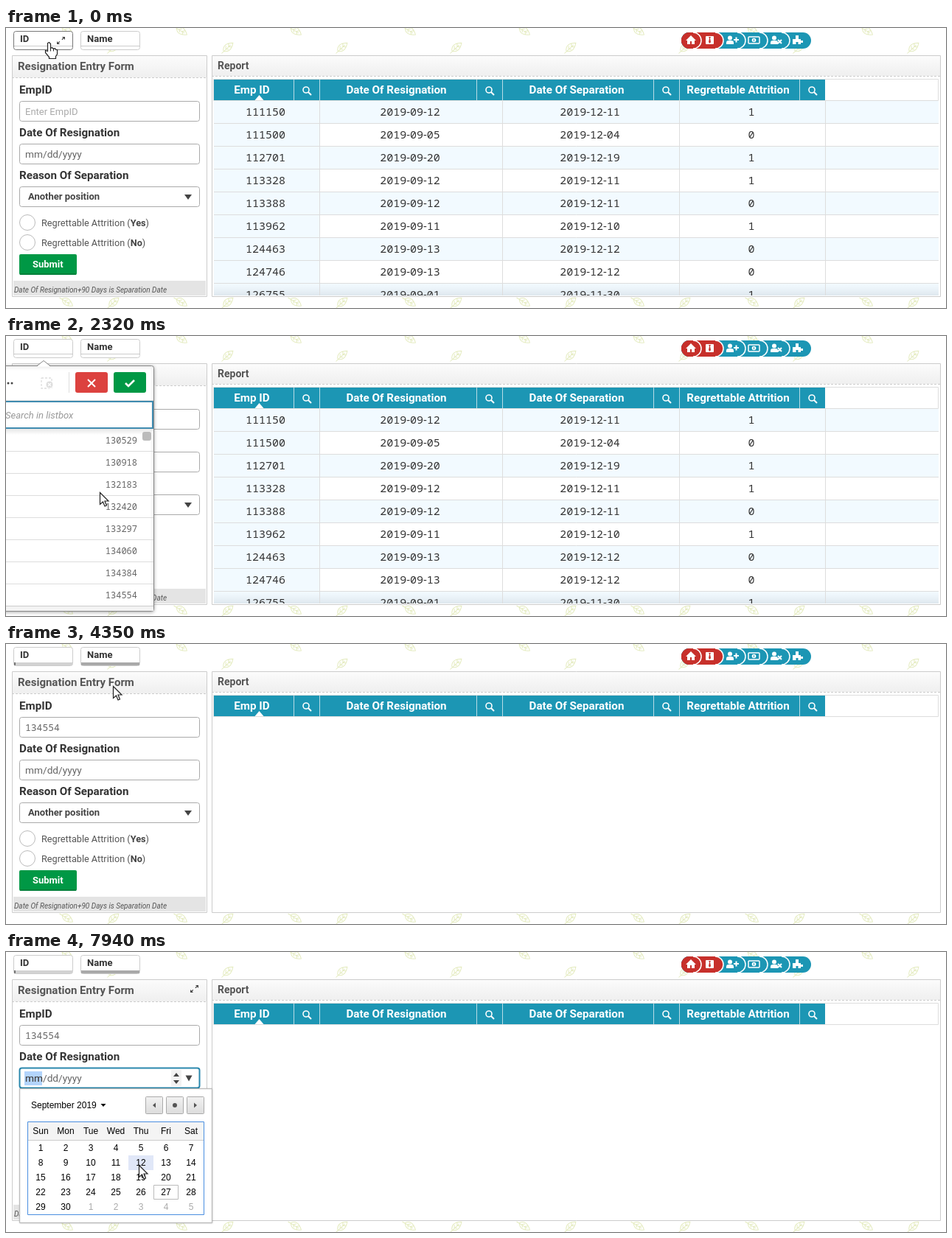
An HTML page with a canvas that plays this animation: 1275x380 px, repeating every 8000 ms.

```html
<!DOCTYPE html>
<html lang="en">
<head>
<meta charset="utf-8">
<title>Resignation Entry Form</title>
<style>
html, body { margin: 0; width: 100%; height: 100%; overflow: hidden; background: #fff; }
canvas { display: block; }
</style>
</head>
<body>
<canvas id="stage" width="1275" height="380"></canvas>
<script>
const c = document.getElementById('stage').getContext('2d');
const LOOP = 8000;
const TEAL = '#1c96b4', RED = '#c7302b', GREEN = '#009845', INK = '#333';
const UI = 'Roboto, sans-serif', MONO = '"Noto Sans Mono", monospace', CAL = '"Liberation Sans", Arial, sans-serif';

// ---- helpers
function fill(x, y, w, h, color) { c.fillStyle = color; c.fillRect(x, y, w, h); }

function box(x, y, w, h, r, color, edge, width = 1) {
  c.beginPath();
  c.roundRect(x, y, w, h, r);
  if (color) { c.fillStyle = color; c.fill(); }
  if (edge) { c.strokeStyle = edge; c.lineWidth = width; c.stroke(); }
}

function poly(points, color, edge, width = 1) {
  c.beginPath();
  points.forEach(([x, y]) => c.lineTo(x, y));
  c.closePath();
  if (color) { c.fillStyle = color; c.fill(); }
  if (edge) { c.strokeStyle = edge; c.lineWidth = width; c.stroke(); }
}

function line(points, color, width = 1, dash = []) {
  c.beginPath();
  points.forEach(([x, y]) => c.lineTo(x, y));
  c.strokeStyle = color;
  c.lineWidth = width;
  c.setLineDash(dash);
  c.stroke();
  c.setLineDash([]);
}

function disc(x, y, r, color, edge, width = 1) {
  c.beginPath();
  c.arc(x, y, r, 0, 7);
  if (color) { c.fillStyle = color; c.fill(); }
  if (edge) { c.strokeStyle = edge; c.lineWidth = width; c.stroke(); }
}

function text(s, x, y, font, color = INK, align = 'left') {
  c.font = font;
  c.fillStyle = color;
  c.textAlign = align;
  c.fillText(s, x, y);
  return c.measureText(s).width;
}

function shade(y0, y1, from, to) {
  const g = c.createLinearGradient(0, y0, 0, y1);
  g.addColorStop(0, from);
  g.addColorStop(1, to);
  return g;
}

function clip(x, y, w, h, draw) {
  c.save();
  c.beginPath();
  c.rect(x, y, w, h);
  c.clip();
  draw();
  c.restore();
}

const down = (x, y, w, h, color) => poly([[x - w / 2, y], [x + w / 2, y], [x, y + h]], color);
const bold = size => `bold ${size}px ${UI}`;
const plain = size => `${size}px ${UI}`;

// ---- background
function leaf(x, y, angle) {
  c.save();
  c.translate(x, y);
  c.rotate(angle);
  c.beginPath();
  c.moveTo(-8, 0);
  c.quadraticCurveTo(-2, -9, 9, 0);
  c.quadraticCurveTo(-2, 9, -8, 0);
  c.moveTo(-12, 1);
  c.lineTo(5, 0);
  for (const k of [-4, 1]) {
    c.moveTo(k, 0); c.lineTo(k + 3, -3);
    c.moveTo(k, 0); c.lineTo(k + 3, 3);
  }
  c.strokeStyle = '#e4ebbf';
  c.lineWidth = 1;
  c.stroke();
  c.restore();
}

function background() {
  fill(0, 0, 1275, 380, '#fff');
  for (let row = 0; row < 9; row++)
    for (let x = -72; x < 1300; x += 155) {
      leaf(x, 4 + row * 46, 0.6);
      leaf(x + 63, (row ? 4 : 26) + row * 46, -0.7);
    }
}

// ---- top bar
function expandIcon(x, y) {
  poly([[x + 5, y - 5], [x + 1, y - 5], [x + 5, y - 1]], '#444');
  poly([[x - 6, y + 5], [x - 2, y + 5], [x - 6, y + 1]], '#444');
  line([[x - 4, y + 3], [x + 4, y - 4]], '#444', 1.2, [2.5, 4]);
}

function filterButton(x, label, bar, hover) {
  box(x + .5, 4.5, 80, 25, 3, '#fff', hover ? '#777' : '#ccc');
  if (bar) fill(x + 1, 25, 79, 4, bar);
  else line([[x + 1, 24.5], [x + 80, 24.5]], '#ccc');
  text(label, x + 9, 19, bold(13));
}

function person(x) {
  disc(x - 2, 13.5, 3, '#fff');
  box(x - 7, 17, 10, 5, [3, 3, 0, 0], '#fff');
}

const navIcons = [
  x => {
    poly([[x - 7, 17], [x, 10], [x + 7, 17], [x + 5, 17], [x + 5, 22], [x - 5, 22], [x - 5, 17]], '#fff');
    fill(x - 1, 18, 2, 4, RED);
  },
  x => {
    box(x - 5, 11, 11, 11, 1, '#fff');
    poly([[x - 1, 12], [x + 2, 12], [x + 1, 14], [x + 2, 19], [x + .5, 21], [x - 1, 19], [x, 14]], RED);
  },
  x => { person(x); fill(x + 3, 15, 7, 2, '#fff'); fill(x + 5.5, 12.5, 2, 7, '#fff'); },
  x => { box(x - 7, 12, 15, 9, 1, null, '#fff', 1.5); disc(x + .5, 16.5, 2.8, '#fff'); fill(x, 15, 1, 3, TEAL); },
  x => { person(x); line([[x + 3, 16], [x + 8, 21]], '#fff', 2); line([[x + 8, 16], [x + 3, 21]], '#fff', 2); },
  x => {
    fill(x - 7, 15, 11, 7, '#fff');
    fill(x - 3, 10, 4, 5, '#fff');
    fill(x + 4, 17, 3, 3, '#fff');
    fill(x - 2.5, 19, 3, 3, TEAL);
  }
];

function nav() {
  for (let i = 5; i >= 0; i--) {
    const right = i === 5 ? 1092 : 943 + i * 30;
    box(916, 6, right - 916, 22, 11, i < 2 ? RED : TEAL);
    if (i === 5) continue;
    c.beginPath();
    c.arc(right - 11, 17, 11, -Math.PI / 2, Math.PI / 2);
    c.strokeStyle = '#fff';
    c.lineWidth = 1.5;
    c.stroke();
  }
  navIcons.forEach((icon, i) => icon(i ? 924 + i * 30 : 929));
}

// ---- panels
function panel(x, w, title, titleX, size, dashY, color) {
  fill(x, 37, w, 328, '#fff');
  fill(x, 37, w, dashY - 37, shade(37, dashY, '#fcfcfc', '#efefef'));
  line([[x, dashY + .5], [x + w, dashY + .5]], '#ccc', 1, [3, 2]);
  box(x + .5, 37.5, w - 1, 327, 0, null, '#ccc');
  text(title, titleX, dashY === 67 ? 57 : 56, bold(size), color);
}

function input(y, edge = '#aaa', width = 1) { box(18.5, y + .5, 244, 27, 3, '#fff', edge, width); }

function form(s) {
  panel(8, 265, 'Resignation Entry Form', 16, 15, 67, '#555');
  if (s.formHover) expandIcon(256, 50);

  text('EmpID', 18, 89, bold(15.2));
  input(99, s.idHover ? '#444' : '#aaa');
  if (s.filled) text('134554', 26, 118, `13px ${MONO}`, '#666');
  else text('Enter EmpID', 26, 118, plain(13), '#aaa');

  text('Date Of Resignation', 18, 147, bold(15.2));
  input(157, s.calendar ? '#2b88ad' : '#aaa', s.calendar ? 2 : 1);
  if (s.calendar) fill(25, 162, 24, 19, '#b3d4fc');
  text('mm/dd/yyyy', 26, 176, plain(13.7), '#666');
  if (s.calendar) text('mm', 26, 176, plain(13.7), '#444');
  if (s.spinner) {
    fill(224, 160, 14, 22, '#f2f2f2');
    down(231, 169, 8, -5, '#444');
    down(231, 174, 8, 5, '#444');
    if (s.arrowHover) fill(241, 163, 15, 17, '#e6e6e6');
    down(248, 167.5, 9, 8, s.arrowHover ? '#777' : '#444');
  }

  text('Reason Of Separation', 18, 205, bold(15.2));
  input(215);
  text('Another position', 30, 233, bold(13), '#444');
  down(247, 226, 10, 7, '#444');

  [['Yes', 264], ['No', 291]].forEach(([word, y]) => {
    disc(29, y, 10.5, '#fff', '#bbb');
    let x = 48;
    x += text('Regrettable Attrition (', x, y + 5, plain(12.7), '#555');
    x += text(word, x, y + 5, bold(12.7), '#444');
    text(')', x, y + 5, plain(12.7), '#555');
  });

  box(18, 307, 78, 28, 2, GREEN);
  fill(19, 333, 76, 2, '#00803a');
  text('Submit', 36, 325, bold(13), '#fff');

  fill(10, 343, 261, 20, '#e4e4e4');
  text('Date Of Resignation+90 Days is Separation Date', 11, 359, `italic 10px ${UI}`, '#555');
}

// ---- report
const edges = [282, 425, 673, 913, 1111];
const centers = [352, 548, 792, 1011];
const titles = [['Emp ID', 333.5], ['Date Of Resignation', 529.5], ['Date Of Separation', 774], ['Regrettable Attrition', 993]];
const resignations = [
  [111150, 12, 1], [111500, 5, 0], [112701, 20, 1], [113328, 12, 1], [113388, 12, 0],
  [113962, 11, 1], [124463, 13, 0], [124746, 13, 0], [126755, 1, 1]
];

function dateAfter(day, extra) {
  return new Date(Date.UTC(2019, 8, day + extra)).toISOString().slice(0, 10);
}

// Digits are monospaced while the hyphen keeps its own narrow width.
function figures(s, cx, y) {
  const runs = String(s).split(/(-)/).map(part => [part, `15px ${part === '-' ? '"Noto Sans", sans-serif' : MONO}`]);
  const widths = runs.map(([part, font]) => { c.font = font; return c.measureText(part).width; });
  let x = cx - widths.reduce((a, b) => a + b) / 2;
  runs.forEach(([part, font], i) => { text(part, x, y, font); x += widths[i]; });
}

function reportRows() {
  resignations.forEach(([id, day, flag], i) => {
    const y = 99 + i * 31;
    fill(282, y, i % 2 ? 143 : 983, 31, '#f2faff');
    if (i === 8) fill(282, 347, 983, 16, shade(347, 363, 'rgba(225,233,239,0)', 'rgba(215,225,232,.75)'));
    [id, dateAfter(day, 0), dateAfter(day, 90), flag].forEach((v, k) => figures(v, centers[k], y + 20));
    line([[282, y + 30.5], [1265, y + 30.5]], '#ddd');
  });
  edges.slice(1).forEach(x => line([[x + .5, 99], [x + .5, 363]], '#ddd'));
}

function report(s) {
  panel(279, 989, 'Report', 287, 14, 65, '#555');
  box(281.5, 69.5, 983, 29, 0, '#fff', '#ddd');
  fill(282, 70, 829, 28, TEAL);
  titles.forEach(([label, x], i) => {
    const split = edges[i + 1] - 35;
    text(label, x, 89, bold(15.2), '#fff', 'center');
    line([[split + .5, 70], [split + .5, 98]], '#b8dce6');
    if (i < 3) line([[split + 35.5, 70], [split + 35.5, 98]], '#b8dce6');
    disc(split + 17, 84, 4, null, '#fff', 1.6);
    line([[split + 20, 87], [split + 24, 91]], '#fff', 2);
  });
  poly([[343.5, 91], [349.5, 98], [337.5, 98]], '#fff');
  if (!s.empty) clip(281, 99, 984, 264, reportRows);
}

// ---- list popup
const listHead = [111150, 111500, 111692, 112701, 113328, 113388, 113746, 113962];
const listTail = [134060, 134384, 134554, 135327, 136468, 137643, 137666, 138021];
const scrollTimes = [1770, 1850, 1930, 2010, 2090, 2320, 2400];

function listId(i) {
  if (i < 8) return listHead[i];
  if (i >= 35) return listTail[i - 35];
  return 113962 + Math.round((i - 7) * 717 + 300 * Math.sin(i * 2.4));
}

function popup(s) {
  c.save();
  c.shadowColor = 'rgba(0,0,0,.3)';
  c.shadowBlur = 4;
  c.shadowOffsetY = 1;
  box(-60, 40.5, 260.5, 333, 3, '#fff', '#888');
  c.restore();
  poly([[42, 41.5], [51, 33.5], [60, 41.5]], '#fff');
  line([[42, 40.5], [51, 33.5], [60, 40.5]], '#888');

  [-2, 3, 8].forEach(x => disc(x, 64, 1.5, '#444'));
  const tool = s.selected ? '#444' : '#ddd';
  c.setLineDash([3, 2]);
  box(48, 57, 14, 14, 0, null, tool, 1.3);
  c.setLineDash([]);
  disc(59, 66, 5, tool, '#fff');
  line([[57, 64], [61, 68]], '#fff', 1.3);
  line([[61, 64], [57, 68]], '#fff', 1.3);
  line([[85.5, 49], [85.5, 77]], '#ddd');

  box(94, 49, 44, 28, 3, '#dc423f');
  line([[111, 59], [121, 69]], '#fff', 2);
  line([[121, 59], [111, 69]], '#fff', 2);
  box(146, 49, 44, 28, 3, GREEN);
  line([[162, 64], [166, 68], [174, 60]], '#fff', 2.6);

  line([[0, 87.5], [200, 87.5]], '#ddd');
  fill(0, 126, 200, 8, shade(126, 134, '#e6e6e6', '#fff'));
  text('Search in listbox', -1, 112, `italic 13px ${UI}`, '#999');

  const offset = 5 * s.scroll;
  for (let i = 0; i < 8; i++) {
    const y = 127 + i * 30, chosen = s.picked && i === 2;
    if (s.empty && !chosen) fill(0, y, 200, 29, '#ddd');
    if (chosen) fill(0, y, 200, 29, GREEN);
    line([[0, y + 29.5], [200, y + 29.5]], '#ddd');
    text(listId(i + offset), 178, y + 19, `12px ${MONO}`, chosen ? '#fff' : '#666', 'right');
    if (chosen) line([[183, y + 16], [185, y + 18], [189, y + 14]], '#14532f', 1.3);
  }
  if (s.searchFocus) box(-10, 89, 209, 36, 0, null, '#3f8bb0', 2);
  else if (s.rowFocus) box(-10, 188, 209, 28, 0, null, '#2f7f9f', 2);
  box(185, 130, 12, 12, 3, '#bbb');
  fill(0, 367, 200, 6, '#f3f3f3');
  line([[0, 366.5], [200, 366.5]], '#ccc');
}

// ---- calendar
function calendar(p) {
  c.save();
  c.shadowColor = 'rgba(0,0,0,.2)';
  c.shadowBlur = 2;
  box(18.5, 185.5, 261, 182, 0, '#fff', '#bbb');
  c.restore();
  const font = `12px ${CAL}`;
  text('September 2019', 34, 212, font, '#000');
  down(132, 206, 7, 4, '#000');
  [189, 217, 245].forEach(x => box(x + .5, 196.5, 23, 23, 1, shade(196, 220, '#f2f2f2', '#dcdcdc'), '#aaa'));
  poly([[199, 208], [203, 204.5], [203, 211.5]], '#555');
  disc(229, 208, 3, '#555');
  poly([[259, 208], [255, 204.5], [255, 211.5]], '#555');

  fill(30, 231, 238, 25, '#f4f4f4');
  line([[30, 255.5], [268, 255.5]], '#ccc');
  ['Sun', 'Mon', 'Tue', 'Wed', 'Thu', 'Fri', 'Sat'].forEach((d, i) => text(d, 47 + i * 34, 247, font, '#000', 'center'));
  const col = Math.floor((p.x - 30) / 34), row = Math.floor((p.y - 256) / 20);
  if (col >= 0 && col < 7 && row >= 0 && row < 5) fill(30 + col * 34, 256 + row * 20, 34, 20, '#e0e7f8');
  for (let i = 0; i < 35; i++)
    text(i < 30 ? i + 1 : i - 29, 47 + (i % 7) * 34, 270 + Math.floor(i / 7) * 20, font, i < 30 ? '#000' : '#aaa', 'center');
  box(200.5, 316.5, 33, 19, 0, null, '#bbb');
  box(29.5, 230.5, 239, 126, 0, null, '#4a8ee0');
}

// ---- pointer
const path = [
  [0, 56, 20], [920, 56, 20], [1200, 84, 95], [1470, 113, 192], [1710, 127, 212], [3650, 127, 212],
  [3900, 246, 130], [4060, 246, 120], [4350, 145, 57], [4430, 130, 45], [4700, 82, 20],
  [5000, 72, 70], [5300, 74, 118], [5600, 74, 118], [5680, 86, 149], [6050, 230, 178],
  [6380, 373, 195], [6460, 373, 193], [6640, 250, 172], [6900, 250, 172], [7100, 190, 255],
  [7330, 112, 290], [7630, 182, 299], [7760, 182, 299], [7860, 180, 289], [LOOP, 180, 289]
];

function pointer(t) {
  const i = path.findIndex(k => k[0] > t);
  const [t0, x0, y0] = path[i - 1], [t1, x1, y1] = path[i];
  const f = (t - t0) / (t1 - t0);
  return { x: Math.round(x0 + (x1 - x0) * f), y: Math.round(y0 + (y1 - y0) * f) };
}

function cursor(p, kind) {
  c.save();
  c.translate(p.x + .5, p.y + .5);
  if (kind === 'beam') {
    line([[-3, -9], [0, -8], [3, -9]], INK);
    line([[0, -8], [0, 8]], INK);
    line([[-3, 9], [0, 8], [3, 9]], INK);
  } else if (kind === 'hand') {
    poly([[0, 0], [2, -1], [4, 1], [4, 7], [6, 6], [8, 8], [10, 7], [11, 9], [13, 9], [13, 15],
      [11, 18], [11, 21], [2, 21], [2, 19], [-3, 13], [-3, 10], [0, 11]], '#fff', '#222', 1.2);
    [4, 8].forEach(x => line([[x, 7], [x, 11]], '#222'));
  } else {
    poly([[0, 0], [0, 16], [4, 12.5], [6.5, 18.5], [9, 17.5], [6.5, 11.5], [11.5, 11.5]], '#fff', '#222', 1.2);
  }
  c.restore();
}

// ---- timeline
function draw(t) {
  const p = pointer(t);
  const within = (a, b) => t >= a && t < b;
  const onFilter = p.y < 31 && p.x >= 10 && p.x <= 91;
  const s = {
    popup: within(310, 4060),
    searchFocus: within(600, 2550),
    scroll: scrollTimes.filter(k => t >= k).length,
    rowFocus: t >= 2550,
    picked: t >= 2620,
    selected: t >= 2870,
    empty: t >= 3110,
    filled: t >= 4060,
    formHover: t >= 4950,
    idHover: within(5130, 5760),
    spinner: t >= 5680,
    calendar: t >= 6690,
    arrowHover: within(6600, 6950)
  };
  background();
  filterButton(10, 'ID', s.selected && '#d2d2d2', onFilter);
  if (s.selected) fill(11, 25, 2, 4, '#777');
  if (onFilter) expandIcon(75, 17);
  filterButton(101, 'Name', s.selected && '#a9a9a9');
  nav();
  form(s);
  report(s);
  if (s.popup) popup(s);
  if (s.calendar) calendar(p);
  cursor(p, onFilter ? 'hand' : s.idHover && p.y > 99 && p.y < 127 ? 'beam' : 'arrow');
}

const start = performance.now();
function tick() {
  draw((performance.now() - start) % LOOP);
  requestAnimationFrame(tick);
}
tick();
</script>
</body>
</html>
```
